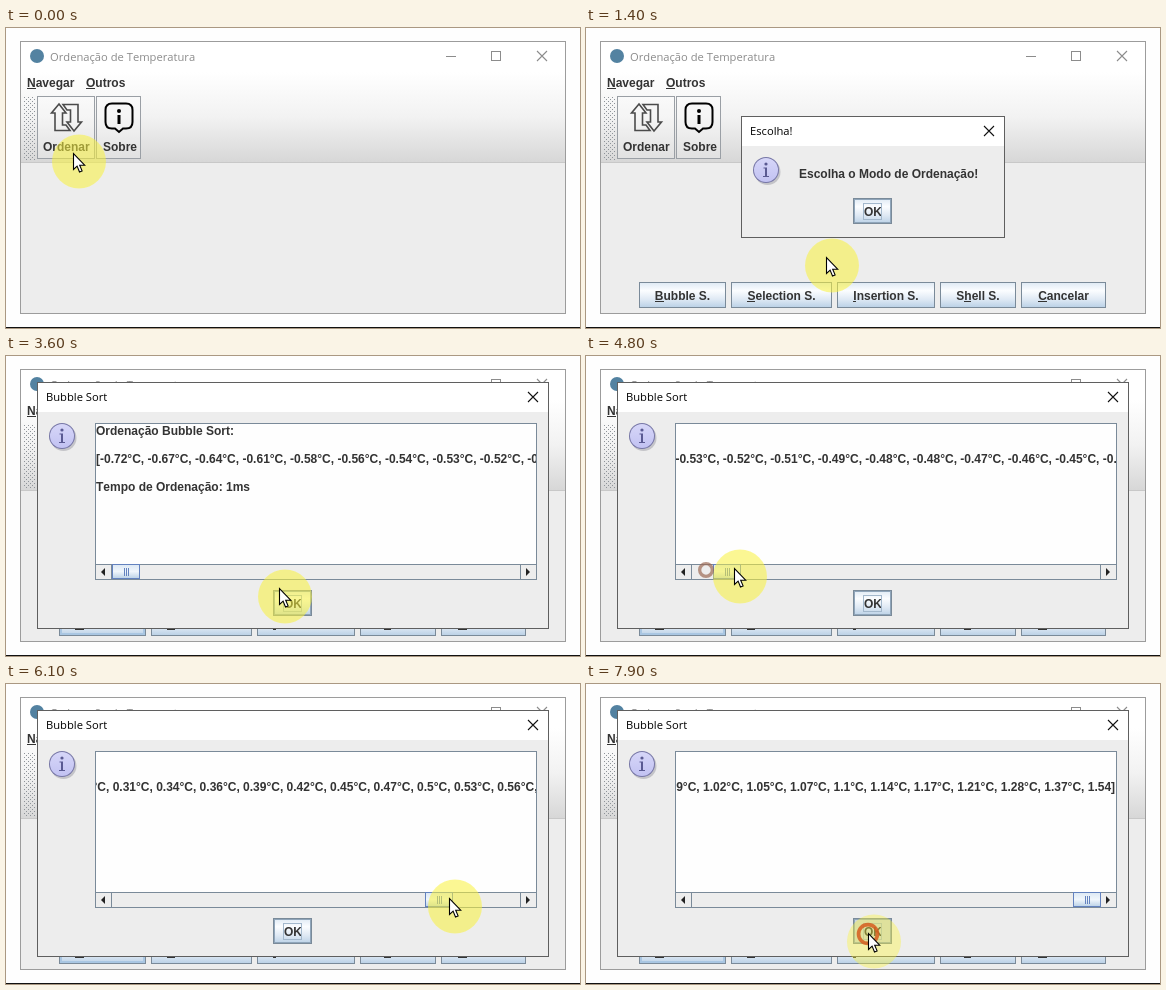
These frames come from a looping animation (574 px wide and 300 px high, 8 s). An HTML page with a canvas:

```html
<!DOCTYPE html>
<html lang="pt">
<head>
<meta charset="utf-8">
<title>Ordenação de Temperatura</title>
<style>
html, body { margin: 0; width: 574px; height: 300px; overflow: hidden; background: #fefefe; }
canvas { display: block; }
</style>
</head>
<body>
<canvas id="stage" width="574" height="300"></canvas>
<script>
const g = document.getElementById('stage').getContext('2d');
const LOOP = 8000;
const BOLD = 'bold 12px "Liberation Sans", Arial, sans-serif';
const TITLE = '11.2px "Open Sans", "Noto Sans", sans-serif';
const STEEL = '#7a8a99';
const INDIGO = '#5a5a92';

// Sorted temperatures: two straight runs with a tail at either end
const COUNT = 148;
const temperature = i => Math.max(-.5605 + .0075 * i, .31 + .02725 * (i - 112))
  - .16 * Math.exp(-i / 3.5) + .28 * Math.exp((i + 1 - COUNT) / 1.4);
const readings = Array.from({ length: COUNT }, (_, i) => Math.round(temperature(i) * 100) / 100 || 0);
const list = '[' + readings.join('°C, ') + ']';
g.fontKerning = 'none';
g.font = BOLD;
const maxScroll = g.measureText(list).width - 439;

// Pointer moves: start, end, x, y
const moves = [
  [0, 0, 67, 125], [1100, 1400, 240, 229], [1400, 1600, 200, 244], [1600, 1800, 292, 182],
  [2200, 2600, 94, 263], [3100, 3600, 273, 232], [3600, 4100, 120, 213],
  [4400, 4800, 148, 212], [4800, 6400, 511, 214], [6900, 7800, 282, 249]];
const scrolls = [[0, 0, 0], [4400, 4800, 337], [4800, 6100, maxScroll - 1107], [6100, 6400, maxScroll]];
const clickTimes = [100, 2000, 2700, 4400, 7800];

function track(steps, t) {
  let [, , ...state] = steps[0];
  for (const [start, end, ...goal] of steps.slice(1)) {
    const p = Math.min(1, Math.max(0, (t - start) / (end - start)));
    state = state.map((v, k) => v + (goal[k] - v) * p);
  }
  return state;
}

function fill(x, y, w, h, color) {
  g.fillStyle = color;
  g.fillRect(x, y, w, h);
}
function frame(x, y, w, h, color) {
  g.strokeStyle = color;
  g.lineWidth = 1;
  g.strokeRect(x + .5, y + .5, w - 1, h - 1);
}
function shape(x, y, path, fillColor, color, width = 1) {
  const p = new Path2D(path);
  g.save();
  g.translate(x, y);
  if (fillColor) { g.fillStyle = fillColor; g.fill(p); }
  if (color) { g.strokeStyle = color; g.lineWidth = width; g.stroke(p); }
  g.restore();
}
function disc(x, y, r, color) {
  g.beginPath();
  g.arc(x, y, r, 0, 7);
  g.fillStyle = color;
  g.fill();
}
const cross = (x, y, color) => shape(x, y, 'M-5-5L5 5M-5 5L5-5', null, color, 1.1);
function shade(y, h, ...stops) {
  const gr = g.createLinearGradient(0, y, 0, y + h);
  stops.forEach((color, i) => gr.addColorStop(i / (stops.length - 1), color));
  return gr;
}
const ocean = (y, h) => shade(y, h, '#dde8f3', '#fbfdff', '#dfe9f4', '#b8cfe5');

function text(s, x, y, font = BOLD, color = '#333') {
  g.font = font;
  g.fillStyle = color;
  g.fillText(s, x, y);
}
// Text with one underlined letter
function mnemonic(s, x, y, index = 0) {
  text(s, x, y);
  const before = g.measureText(s.slice(0, index)).width;
  fill(Math.round(x + before), y + 1, Math.round(g.measureText(s[index]).width), 1, '#333');
}

function button(s, x, w, index) {
  fill(x, 254, w, 26, ocean(254, 26));
  frame(x, 254, w, 26, STEEL);
  g.font = BOLD;
  mnemonic(s, x + (w - g.measureText(s).width) / 2, 272, index);
}
function okButton(y, pressed) {
  fill(267, y, 39, 26, pressed ? '#cdd5dc' : ocean(y, 26));
  frame(267, y, 39, 26, STEEL);
  frame(268, y + 1, 37, 24, '#8fa5ba');
  text('OK', 278, y + 18);
  frame(277, y + 5, 19, 17, '#a3b8cc');
}
function infoIcon(x, y) {
  disc(x + 1.5, y + 2, 13, '#c4c4c8');
  disc(x, y, 13, '#7676a6');
  disc(x, y, 12, shade(y - 12, 24, '#d6d6f8', '#c2c2f2'));
  disc(x, y - 6, 1.6, INDIGO);
  shape(x, y, 'M-2.5-2.5h3.5v8.5h2v1h-6v-1h2v-7.5h-1.5z', INDIGO);
}

function mainWindow(t, active, buttons) {
  const ink = active ? '#000' : '#8c8c8c';
  fill(14, 13, 546, 273, '#ededed');
  fill(15, 14, 544, 30, '#fff');
  fill(15, 44, 544, 90, shade(44, 90, '#ffffff', '#f2f2f2', '#d7d7d7'));
  fill(15, 134, 544, 1, '#c8c8c8');
  frame(14, 13, 546, 273, '#9c9c9c');

  disc(31, 28, 7, '#5382a1');
  text('Ordenação de Temperatura', 44, 33, TITLE, ink);
  fill(440, 28, 10, 1, ink);
  frame(485, 23, 10, 10, ink);
  cross(536, 28, ink);
  mnemonic('Navegar', 21, 59);
  mnemonic('Outros', 80, 59);

  for (let y = 69; y < 132; y += 2)
    for (let x = 17 + y % 4; x < 29; x += 4) fill(x, y, 1, 1, '#8e9399');

  for (const [x, w] of [[31, 58], [90, 45]]) {
    fill(x, 68, w, 63, 'rgba(255,255,255,.2)');
    frame(x, 68, w, 63, '#9a9fa5');
  }
  if (t >= 100 && t < 600) fill(32, 69, 56, 61, 'rgba(130,150,170,.25)');
  if (active && t >= 300) frame(36, 73, 49, 54, '#b3bfcb');
  text('Ordenar', 37, 123);
  text('Sobre', 97, 123);

  const arrow = 'M53 76l7 9h-3.5v12h3.5l4 5.5h-15v-17.5h-3.5z';
  shape(0, 0, arrow, null, '#4b4b4b', 1.6);
  g.save();
  g.translate(121, 179);
  g.rotate(Math.PI);
  shape(0, 0, arrow, null, '#4b4b4b', 1.6);
  g.restore();

  shape(113, 75.5, 'M-7 0h14q6.5 0 6.5 6.5v12q0 6.5-6.5 6.5h-3l-4 3.5-4-3.5h-3q-6.5 0-6.5-6.5v-12q0-6.5 6.5-6.5z',
    null, '#000', 2);
  disc(113, 83, 2, '#000');
  fill(111.5, 87, 3, 9, '#000');

  if (!buttons) return;
  button('Bubble S.', 53, 87);
  button('Selection S.', 145, 101);
  button('Insertion S.', 251, 98);
  button('Shell S.', 354, 76, 1);
  button('Cancelar', 435, 85);
  if (t >= 2600) {
    frame(54, 255, 85, 24, '#a9c6e2');
    frame(55, 256, 83, 22, '#a9c6e2');
  }
}

function dialog(title, x, y, w, h) {
  fill(x, y, w, h, '#ededed');
  fill(x, y, w, 30, '#fff');
  frame(x, y, w, h, '#5f5f5f');
  text(title, x + 9, y + 19, TITLE, '#000');
  cross(x + w - 16, y + 15, '#111');
}

function choiceDialog(t) {
  dialog('Escolha!', 155, 88, 264, 122);
  infoIcon(180, 142);
  text('Escolha o Modo de Ordenação!', 213, 150);
  okButton(170, t >= 1900);
}

function resultDialog(t) {
  const [scroll] = track(scrolls, t);
  dialog('Bubble Sort', 31, 26, 512, 247);
  infoIcon(56, 80);
  fill(89, 67, 442, 157, '#fefefe');
  g.save();
  g.beginPath();
  g.rect(90, 68, 440, 140);
  g.clip();
  const x = 90 - Math.round(scroll);
  text('Ordenação Bubble Sort:', x, 79);
  text(list, x, 107);
  text('Tempo de Ordenação: 1ms', x, 135);
  g.restore();

  fill(90, 208, 440, 15, '#ededed');
  fill(90, 208, 440, 1, STEEL);
  fill(105, 209, 1, 14, STEEL);
  fill(514, 209, 1, 14, STEEL);
  shape(95, 216, 'M4-4v8l-4-4z', '#222');
  shape(524, 216, 'M-4-4v8l4-4z', '#222');
  const thumb = 106 + Math.round(scroll / maxScroll * 381);
  fill(thumb, 208, 28, 15, shade(208, 15, '#dbe7f3', '#f0f6fc', '#b8cfe5'));
  frame(thumb, 208, 28, 15, '#6382bf');
  for (let dx = 12; dx < 18; dx += 2) fill(thumb + dx, 212, 1, 8, '#6382bf');
  frame(89, 67, 442, 157, STEEL);
  okButton(234, t >= 7800);
}

function pointer(t) {
  const [x, y] = track(moves, t).map(Math.round);
  const click = clickTimes.find(at => t >= at && t <= at + 500);
  const age = click === undefined ? 1 : (t - click) / 500;
  disc(x + 6, y + 8.5, 27, `rgba(250,243,60,${age < .4 && t > 200 ? .4 : .55})`);
  if (age < 1) {
    const [cx, cy] = track(moves, click);
    const mix = (a, b) => a + (b - a) * age;
    g.beginPath();
    g.arc(cx, cy + 1, mix(10.5, 5.3), 0, 7);
    g.strokeStyle = `rgba(${mix(232, 135)},${mix(90, 105)},${mix(15, 95)},${mix(.92, .62)})`;
    g.lineWidth = mix(3.8, 3.2);
    g.stroke();
  }
  shape(x + .5, y + .5, 'M0 0v16l3.6-3.4 2.4 5.9 2.6-1.1-2.4-5.7h5z', '#fff', '#000', 1.1);
}

function faded(alpha, paint, t) {
  g.globalAlpha = alpha;
  paint(t);
  g.globalAlpha = 1;
}

function draw(now) {
  let t = Math.floor(now % LOOP / 100) * 100;
  if (t % 500 === 200) t -= 100;
  const choice = t >= 600 && t < 2000, result = t >= 2900;
  fill(0, 0, 574, 300, '#fefefe');
  fill(0, 299, 574, 1, '#111');
  mainWindow(t, t >= 100 && !choice && !result, t >= 600);
  if (choice) faded(t < 800 ? .7 : 1, choiceDialog, t);
  if (result) faded(t < 3000 ? .6 : 1, resultDialog, t);
  pointer(t);
  requestAnimationFrame(draw);
}
requestAnimationFrame(draw);
</script>
</body>
</html>
```
